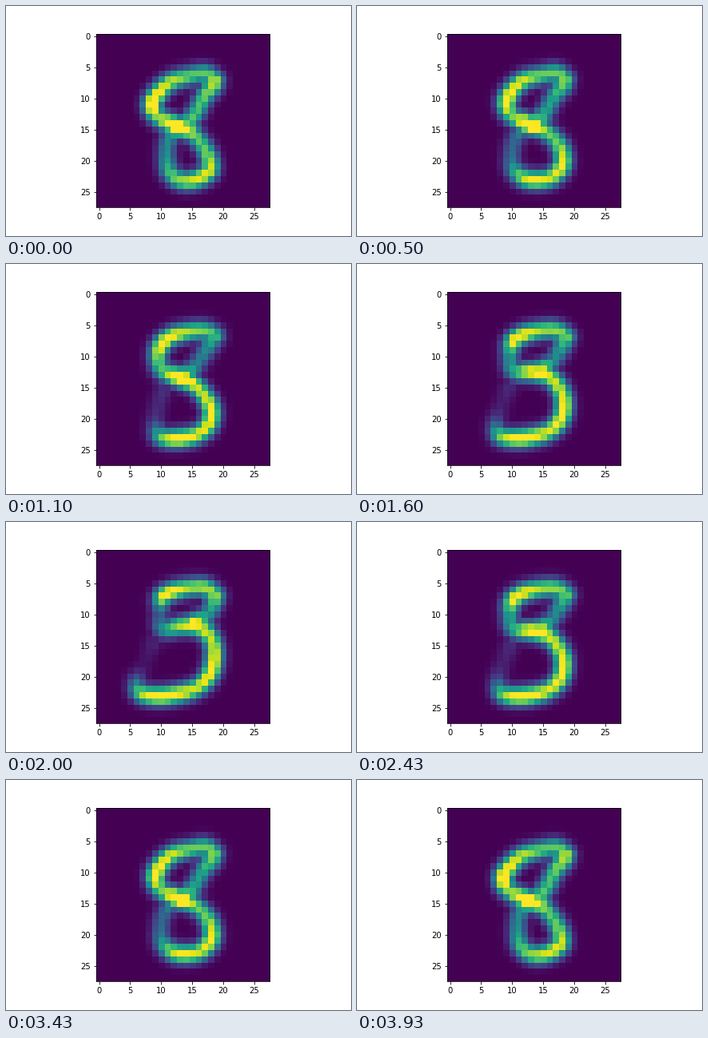
Write a matplotlib script that moves like this. It is 432 by 288 pixels and loops after 4030 ms.

```python
import numpy as np
import matplotlib.pyplot as plt
from matplotlib.animation import FuncAnimation

GRID = 28
STEP_MS = 100
TURN_MS = 2030      # the last pose is cut short, then the morph runs back
LOOP_MS = 4030
TICK_MS = 10
LAST = 20
PEN = 1.45          # stroke softness in cells
ARM = 18            # first point of the upper right arm

# Each pose: (x, y, strength) along the outline, then along the arm.
EIGHT = [
    (18.6, 7.2, .92), (17, 6, .75), (14.5, 6.4, .78), (11.6, 7.3, .92),
    (9.6, 9, 1.04), (8.5, 11, 1.2), (9.5, 13, .85), (12.6, 14.5, 1.3),
    (14.8, 15.5, .88), (16.4, 17.3, .75), (17.6, 19.5, .85),
    (17.7, 21.6, .98), (15.6, 23, .97), (13.2, 23.2, .85),
    (11.3, 21.8, .72), (10.8, 19.2, .52), (11.1, 16.8, .5), (12.5, 15, .7),
    (14.2, 14, .8), (15.6, 12.2, .72), (16.8, 9.8, .78), (18.4, 7.8, .92),
]
NARROW = [
    (18.4, 7, .85), (17, 5.9, .78), (14.5, 6.3, .8), (11.8, 7.1, .95),
    (9.9, 8.8, 1.05), (9, 10.8, 1.1), (10, 12.9, .8), (12.8, 14.2, 1.3),
    (15, 15.1, .88), (16.9, 16.7, .78), (18, 18.8, .92),
    (17.9, 21, 1.02), (16, 22.8, .95), (13, 23.1, 1),
    (10.9, 22.2, .75), (9.9, 20.3, .42), (10.2, 17.2, .34), (11.5, 15, .5),
    (13.8, 13.8, .8), (15.3, 12.2, .6), (16.6, 9.8, .62), (18.2, 7.8, .8),
]
OPEN = [
    (18.6, 6.7, .72), (17, 5.9, .8), (14.5, 6, .88), (11.6, 6.8, 1.05),
    (10, 8.2, 1.08), (9.4, 10, .85), (10.2, 12.3, .75), (13, 13.4, 1.25),
    (15.2, 14.5, .98), (17, 16.5, .95), (18, 18.6, 1.02),
    (17.6, 20.9, 1.02), (15.6, 22.6, .98), (12.6, 23.2, 1.1),
    (9.9, 22.9, .75), (9, 20.8, .22), (9.5, 17.8, .12), (10.3, 15.5, .15),
    (14, 13, .8), (15.4, 11.6, .48), (16.8, 9.5, .45), (18, 7.7, .6),
]
THREE = [
    (18.7, 7, .85), (17, 5.7, .9), (14.5, 5.7, .88), (11.8, 6.3, 1.05),
    (10.2, 7.2, 1), (9.8, 9.3, .33), (10.2, 12.3, .52), (13.6, 11.8, .95),
    (16.6, 12.4, .98), (18.2, 14.4, .92), (18.5, 17, 1.02),
    (17.6, 19.9, 1.05), (15.2, 22, .95), (10.5, 23.1, 1.1),
    (6.8, 22.7, .87), (6, 20.8, .33), (7, 18.6, .06), (8.7, 14.5, .1),
    (15, 11.5, 1.2), (17.3, 10.2, .55), (18, 9, .6), (18.6, 7.6, .8),
]
POSES = np.array([EIGHT, NARROW, OPEN, THREE])
POSE_STEPS = [0, 5, 11, LAST]


def pose_at(step):
    i = min(np.searchsorted(POSE_STEPS, step, side="right") - 1, 2)
    a, b = POSE_STEPS[i:i + 2]
    return POSES[i] + (POSES[i + 1] - POSES[i]) * (step - a) / (b - a)


def smooth(points, n=10):
    """Catmull-Rom curve through the points."""
    p = np.vstack([points[:1], points, points[-1:]])
    a, b, c, d = (p[i:len(p) - 3 + i, None] for i in range(4))
    t = np.linspace(0, 1, n)[None, :, None]
    curve = b + .5 * t * (c - a + t * (2 * a - 5 * b + 4 * c - d
                                       + t * (3 * (b - c) + d - a)))
    return curve.reshape(-1, 3)


def digit(step):
    pose = pose_at(step)
    x, y, strength = np.vstack([smooth(pose[:ARM]), smooth(pose[ARM:])]).T
    rows, cols = np.mgrid[:GRID, :GRID, :1][:2]
    dist2 = (cols - x) ** 2 + (rows - y) ** 2
    ink = (strength * np.exp(-dist2 / PEN ** 2)).max(axis=2)
    ink = np.clip(ink, 0, 1)
    return ink / ink.max()


def step_at(ms):
    if ms < TURN_MS:
        return min(ms // STEP_MS, LAST)
    return LAST - 1 - (ms - TURN_MS) // STEP_MS


digits = [digit(step) for step in range(LAST + 1)]

fig, ax = plt.subplots(figsize=(6, 4), dpi=72)
fig.subplots_adjust(left=.125, right=.9, bottom=.125, top=.88)
image = ax.imshow(digits[0], cmap="viridis", vmin=0, vmax=1,
                  interpolation="nearest")
ax.set_xticks(range(0, GRID, 5))
ax.set_yticks(range(0, GRID, 5))


def update(frame):
    image.set_data(digits[step_at(frame * TICK_MS)])
    return [image]


anim = FuncAnimation(fig, update, frames=LOOP_MS // TICK_MS,
                     interval=TICK_MS, repeat=True, repeat_delay=0)
plt.show()
```
